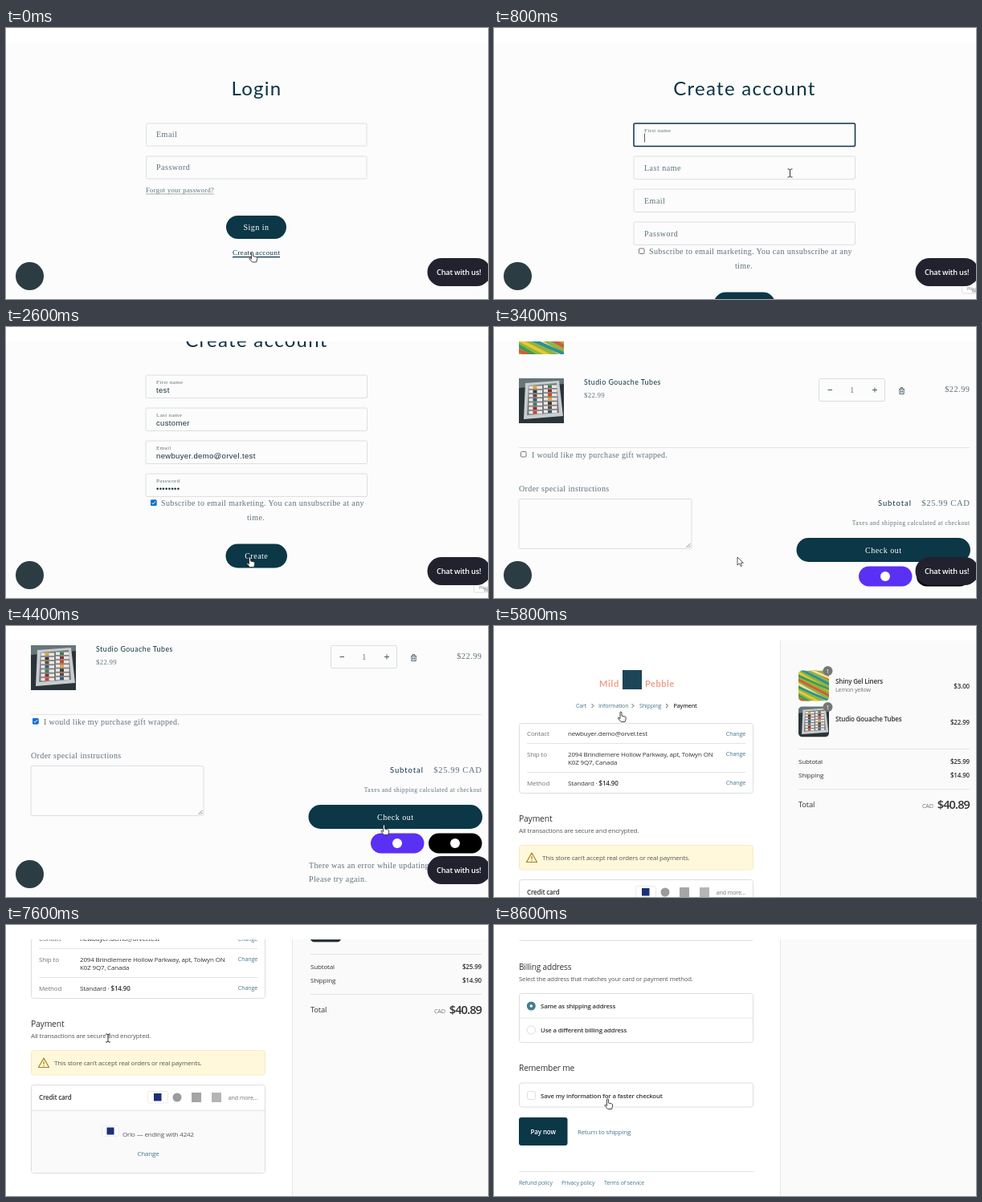
Recreate the animation shown at these times as an HTML page. Size 600 px wide and 338 px high, loop 8.8 s.

```html
<!DOCTYPE html>
<html lang="en">
<head>
<meta charset="utf-8">
<title>Store checkout</title>
<style>
  html, body { margin: 0; width: 100%; height: 100%; overflow: hidden; background: #fff; }
  svg#stage { display: block; width: 100vw; height: 100vh; }
  text { white-space: pre; }
  .serif { font: 10px "Liberation Serif", serif; letter-spacing: .38px; fill: #5d727a; }
  .head { font: 24px Lato, sans-serif; letter-spacing: 1.3px; fill: #0c3344; }
  .input { font: 9.5px "Liberation Sans", sans-serif; letter-spacing: .35px; fill: #17313c; }
  .ui { font: 8px "Open Sans", sans-serif; letter-spacing: -.02em; fill: #333; }
  .bold { font-weight: 600; }
  .grey { fill: #737373; }
  .link { fill: #457789; }
  .white { fill: #fff; }
  .dark { fill: #0c3344; }
  .mid { text-anchor: middle; }
  .end { text-anchor: end; }
  .teal { fill: #0b3747; }
  .line { stroke: #e4e4e4; fill: none; }
  .card { fill: #fff; stroke: #dedede; }
  .field { fill: #fcfcfc; stroke: #dcdfe0; }
</style>
</head>
<body>
<svg id="stage" viewBox="0 0 600 338">
  <defs>
    <clipPath id="view"><rect y="18" width="600" height="320"/></clipPath>
    <clipPath id="square"><rect width="56" height="56"/></clipPath>
    <clipPath id="round"><rect width="56" height="56" rx="7"/></clipPath>
  </defs>
  <g clip-path="url(#view)" id="world"></g>
  <g id="pointer">
    <path id="hand" fill="#fff" stroke="#333" stroke-width=".9" stroke-linejoin="round"
      d="M-1 1a1 1 0 0 1 2 0v4l4 1q1.6.5 1.2 2l-1 4.5h-5.2l-3.6-4.3q-.2-1.6 1.6-.4l1 .9z"/>
    <path id="beam" fill="none" stroke="#333" d="M-3-5h2l1 1 1-1h2M-3 5h2l1-1 1 1h2M0-4V4"/>
    <path id="arrow" fill="#fff" stroke="#333" stroke-width=".8" d="M0 0v10l2.4-2.2 1.8 3.7 1.6-.8-1.7-3.5h3.2z"/>
  </g>
</svg>
<script>
const STEP = 200, LOOP = 8800;
const $ = id => document.getElementById(id);

// Markup helpers
const text = (x, y, str, cls, style = '') => `<text x="${x}" y="${y}" class="${cls}" style="${style}">${str}</text>`;
const size = (px, gap) => `font-size:${px}px` + (gap === undefined ? '' : `;letter-spacing:${gap}px`);
const rect = (x, y, w, h, rest = '') => `<rect x="${x}" y="${y}" width="${w}" height="${h}" ${rest}/>`;
const rule = (x1, x2, y) => `<path class="line" d="M${x1} ${y}H${x2}"/>`;
const disc = (x, y, r, rest) => `<circle cx="${x}" cy="${y}" r="${r}" ${rest}/>`;
const range = (n, fn) => Array.from({ length: n }, (_, i) => fn(i)).join('');
const pill = (x, y, w, h, label, base) => rect(x, y, w, h, `rx="${h / 2}" class="teal"`) +
  text(x + w / 2, base, label, 'serif white mid', size(10, .5));
const box = (x, y, id) => rect(x + .5, y + .5, 6.5, 6.5, 'rx="1" fill="#fff" stroke="#777"') +
  `<g id="${id}">${rect(x, y, 7.5, 7.5, 'rx="1" fill="#0b6fd3"')}<path d="M${x + 1.6} ${y + 3.8}l1.6 1.6 2.8-3.4" fill="none" stroke="#fff"/></g>`;

// Product pictures reduced to flat shapes
const photo = (x, y, w, body, clip) =>
  `<g transform="translate(${x} ${y}) scale(${w / 56})"><g clip-path="url(#${clip})">${body}</g></g>`;
const paints = ['#d9a43a', '#c8452f', '#8d2f35', '#3f7d4b', '#315c80', '#6b4636', '#39393b'];
const tubes = rect(0, 0, 56, 56, 'fill="#2b3439"') +
  '<path d="M0 0H56V7L0 12Z" fill="#66757a"/><path d="M8 6L50 3L55 47L6 51Z" fill="#c9cdd0"/>' +
  '<path d="M12 9L47 6L50 43L10 46Z" fill="#77797f"/>' +
  range(14, i => {
    const px = 12.5 + (i % 2) * 18.5, y = 9.5 + (i >> 1) * 5.2 - (i % 2);
    return rect(px, y, 16.5, 3.6, 'fill="#e9e6e0"') + rect(px + 5, y, 5, 3.6, `fill="${paints[(i * 3) % 7]}"`);
  });
const pens = rect(0, 0, 56, 56, 'fill="#8fb443"') + range(16, i =>
  `<path d="M-8 ${i * 7 - 36}L64 ${i * 7 - 4 + (i % 3) * 5}" stroke="${['#e8c832', '#3f9a55', '#d9573c', '#f0e3a0', '#2d8f9a'][i % 5]}" stroke-width="4"/>`);

// Login
const login = text(312, 84, 'Login', 'head mid') +
  ['Email', 'Password'].map((s, i) => rect(174.5, 119 + i * 41, 274.5, 28, 'rx="1.5" class="field"') +
    text(187, 136 + i * 41, s, 'serif', size(10, .5))).join('') +
  text(174, 205, 'Forgot your password?', 'serif', size(8.5, .33)) +
  '<path d="M174 207H259" stroke="#8b9aa0" stroke-width=".8"/>' +
  pill(274, 234, 75, 29, 'Sign in', 252) +
  text(282, 282.5, 'Create account', 'serif dark', size(9, .4)) +
  '<path d="M282 285.6H341" stroke="#0c3344" stroke-width="1.4"/>';

// Registration form
const dots = n => '•'.repeat(n);
const fields = [
  { label: 'First name', value: { 0: '', 5: 'test' } },
  { label: 'Last name', value: { 0: '', 6: 'customer' } },
  { label: 'Email', value: { 0: '', 7: 'newbuyer.demo', 8: 'newbuyer.demo@orvel.test' } },
  { label: 'Password', value: { 0: '', 9: dots(4), 10: dots(8) } }
];
const register = text(312, 84, 'Create account', 'head mid') +
  fields.map((f, i) => {
    const y = 119 + i * 41;
    return rect(174, y, 275.5, 28.5, `id="frame${i}" rx="1.5" class="field"`) +
      text(187, 0, f.label, 'serif').replace('<text', `<text id="label${i}"`) +
      text(187, y + 21.5, '', 'input').replace('<text', `<text id="value${i}"`);
  }).join('') +
  rect(0, 0, .8, 11, 'id="caret" fill="#333"') +
  box(180, 274.5, 'optin') +
  text(193, 282, 'Subscribe to email marketing. You can unsubscribe at any', 'serif') +
  text(311, 299.5, 'time.', 'serif mid') +
  pill(273.5, 329.5, 76.5, 30, 'Create', 348);

// Cart
const cartRow = (y, pic, name, price) => photo(31, y, 56, pic, 'square') +
  text(112, y + 8, name, 'head', size(8.8, .5)) +
  text(112, y + 24, price, 'serif', size(8.8, .3)) +
  rect(404.5, y + .5, 82, 28, 'rx="1.5" class="field"') +
  `<path d="M415.5 ${y + 14.5}h5.5M471 ${y + 14.5}h6M474 ${y + 11.5}v6" stroke="#44606b" fill="none"/>` +
  text(446, y + 17.5, '1', 'serif mid') +
  `<path d="M504 ${y + 13.5}h7M506.2 ${y + 13}v-1.5h2.6v1.5M504.8 ${y + 14}v5.5h5.4v-5.5M506.6 ${y + 15}v3M508.4 ${y + 15}v3" fill="none" stroke="#2a4854" stroke-width=".8"/>` +
  text(592.5, y + 17, price, 'serif end', size(10.3, .5));
const cart = cartRow(-62, pens, 'Shiny Gel Liners', '$3.00') +
  cartRow(24, tubes, 'Studio Gouache Tubes', '$22.99') +
  rule(31, 592, 110.5) + box(33, 115, 'wrap') +
  text(47, 123, 'I would like my purchase gift wrapped.', 'serif', size(10, .31)) +
  text(31, 165, 'Order special instructions', 'serif') +
  rect(31, 174.5, 215, 62, 'rx="1.5" class="field"') +
  '<path d="M239.5 235l5-5M242.5 235l2-2" stroke="#666" stroke-width=".8"/>' +
  text(478, 183, 'Subtotal', 'head', size(9.4, .95)) +
  text(592.5, 183, '$25.99 CAD', 'serif end', size(10.6, .6)) +
  text(592.5, 207, 'Taxes and shipping calculated at checkout', 'serif end', size(7.5, .5)) +
  pill(376.5, 223, 216.5, 30, 'Check out', 241.5) +
  rect(454, 258.5, 66.5, 25, 'rx="12.5" fill="#5a31f4"') + disc(487, 271, 6, 'fill="#fff"') +
  rect(526, 258.5, 66.5, 25, 'rx="12.5"') + disc(559, 271, 6, 'fill="#fff"') +
  `<g id="error">${text(377, 301.5, 'There was an error while updating your cart.', 'serif')}${text(377, 318.5, 'Please try again.', 'serif')}</g>`;

// Checkout
const infoRow = (y, key, lines) => text(41, y, key, 'ui grey') +
  lines.map((s, i) => text(92, y + i * 10.5, s, 'ui')).join('') +
  text(313, y - .5, 'Change', 'ui link end', size(7.1));
const itemRow = (y, pic, name, note, price) => photo(379, y - .5, 38, pic, 'round') +
  disc(415.5, y, 6, 'fill="#777"') + text(415.5, y + 2.5, '1', 'ui white mid', size(7.3)) +
  text(425, y + (note ? 16 : 18), name, 'ui bold') + text(425, y + 25.5, note, 'ui grey', size(7.1)) +
  text(592, y + 21.5, price, 'ui bold end');
const sumRow = (y, key, price) => text(379, y, key, 'ui') + text(592, y, price, 'ui bold end');
const panel = (y, h) => rect(31.5, y + .5, 291, h, 'rx="3" class="card"');
const crumbs = [[102, 'Cart'], [130, 'Information'], [181, 'Shipping'], [223.5, 'Payment']];
const logo = ';font-weight:700;fill:#f09d85';
const small = 'rx="2" class="card" style="stroke:#ececec"';

const checkout = text(131, 76, 'Mild', 'head', size(11, .7) + logo) +
  text(188, 76, 'Pebble', 'head', size(11, .5) + logo) +
  rect(160, 55, 24, 24, 'fill="#1d4558"') +
  crumbs.map(([x, s], i) => text(x, 102, s, i < 3 ? 'ui link' : 'ui bold', size(7))).join('') +
  [121.5, 171.5, 214].map(x => `<path d="M${x} 97l2.5 2.5-2.5 2.5" fill="none" stroke="#555"/>`).join('') +
  panel(121, 87) +
  infoRow(137, 'Contact', ['newbuyer.demo@orvel.test']) + rule(41, 313, 146.5) +
  infoRow(162.5, 'Ship to', ['2094 Brindlemere Hollow Parkway, apt, Tolwyn ON', 'K0Z 9Q7, Canada']) + rule(41, 313, 182.5) +
  infoRow(198.5, 'Method', ['Standard · <tspan class="bold">$14.90</tspan>']) +
  text(31, 244, 'Payment', 'ui', size(10.4)) +
  text(31, 257.5, 'All transactions are secure and encrypted.', 'ui', 'fill:#555') +
  rect(31.5, 273.5, 291, 30.5, 'rx="3" fill="#fff8db" stroke="#f5ebc4"') +
  '<path d="M47 283l6.5 11.5h-13zM47 287v4M47 292v1.2" fill="none" stroke="#a5831c" stroke-width="1.2" stroke-linejoin="round"/>' +
  text(60, 291.5, 'This store can’t accept real orders or real payments.', 'ui', 'fill:#555') +
  panel(316, 110) + '<path d="M32 348.5H322V423q0 3-3 3H35q-3 0-3-3Z" fill="#fafafa"/>' + rule(32, 322, 348.5) +
  text(41, 334.5, 'Credit card', 'ui bold') +
  rect(176.5, 324.5, 25, 14.5, small) +
  rect(184, 327, 9.5, 9.5, 'fill="#1c2f78"') + disc(213, 332, 5.5, 'fill="#9b9b9b"') +
  rect(231, 326, 12, 12, 'fill="#a5a5a5"') + rect(256, 326, 12, 12, 'fill="#b5b5b5"') +
  text(313, 335, 'and more...', 'ui grey end', size(7.1)) +
  rect(119.5, 367.5, 21, 13, small) + rect(125.5, 369.5, 9, 9, 'fill="#1c2f78"') +
  text(145, 381, 'Orlo — ending with 4242', 'ui', 'fill:#555') +
  text(177, 405, 'Change', 'ui link mid') +
  text(31, 463, 'Billing address', 'ui', size(10.1)) +
  text(31, 477, 'Select the address that matches your card or payment method.', 'ui', size(7.7) + ';fill:#555') +
  panel(492, 61) + rule(32, 322, 523) +
  disc(46.3, 508, 5.5, 'fill="#457d92"') + disc(46.3, 508, 1.7, 'fill="#fff"') + disc(46.3, 538, 5.2, 'class="card"') +
  text(58, 511, 'Same as shipping address', 'ui bold', size(7.8)) +
  text(58, 541, 'Use a different billing address', 'ui bold', size(7.8)) +
  text(31, 589, 'Remember me', 'ui', size(10.3)) +
  panel(603.5, 30) + rect(41.5, 614.5, 10, 10, 'rx="2" class="card"') +
  text(58, 622.5, 'Save my information for a faster checkout', 'ui bold', size(7.8)) +
  rect(31, 647, 60.5, 35, 'rx="3" class="teal"') + text(61.2, 668, 'Pay now', 'ui bold white mid') +
  text(104, 668, 'Return to shipping', 'ui link') + rule(31, 323, 714.5) +
  [[31, 'Refund policy'], [84, 'Privacy policy'], [137, 'Terms of service']].map(([x, s]) => text(x, 731, s, 'ui link', size(6.9))).join('') +
  itemRow(56, pens, 'Shiny Gel Liners', 'Lemon yellow', '$3.00') +
  itemRow(101, tubes, 'Studio Gouache Tubes', '', '$22.99') +
  rule(379, 592, 153.5) + sumRow(172, 'Subtotal', '$25.99') + sumRow(188.5, 'Shipping', '$14.90') +
  rule(379, 592, 203.5) + text(379, 226, 'Total', 'ui', size(9.4)) +
  text(547, 226.5, 'CAD', 'ui grey end', size(7.3)) +
  text(592, 228, '$40.89', 'ui bold end', size(14.6, -.9));

const scene = (id, body) => `<g id="${id}">${body}</g>`;
$('world').innerHTML =
  scene('shop', rect(0, 18, 600, 320, 'fill="#fcfcfc"')) +
  scene('login', login) + scene('register', register) + scene('cart', cart) +
  scene('sidebar', rect(356, 18, 244, 319.5, 'fill="#fafafa"') + '<path class="line" d="M356.5 18V337.5"/>') +
  scene('checkout', checkout) +
  scene('privacy', rect(582.5, 317.5, 20, 13.5, 'rx="1.5" class="card"') +
    text(589, 326.5, 'Privacy', 'ui grey', size(5.5)) + text(594, 330, 'Terms', 'ui grey', size(5))) +
  scene('overlay', disc(29.5, 309.5, 17.5, 'fill="#2c3c43"') +
    rect(524.5, 287, 79, 35, 'rx="17.5" fill="#22222f"') + text(536, 308, 'Chat with us!', 'ui bold white', size(9.2)));

// Timelines: a value holds from its step until the next key
const at = (keys, n) => keys[Object.keys(keys).map(Number).filter(k => k <= n).pop()];
const sceneKeys = { 0: 'login', 2: '', 3: 'register', 15: '', 16: 'cart', 25: '', 26: 'checkout' };
const scrollKeys = { 0: 0, 11: 30, 12: 59, 16: -86, 17: -40, 18: 0, 38: 117, 39: 205, 40: 290, 41: 365, 42: 407 };
const focusKeys = { 0: -1, 4: 0, 6: 1, 7: 2, 9: 3, 11: -1 };
const pointerKeys = {
  0: ['hand', 306.5, 279.5], 4: ['beam', 368.5, 181], 11: ['beam', 300, 205], 12: ['arrow', 184, 220],
  13: ['hand', 303.5, 287], 16: ['arrow', 303, 287], 18: ['arrow', 180, 200],
  20: ['arrow', 37, 119], 21: ['arrow', 260, 190], 22: ['hand', 470.5, 248], 26: ['arrow', 420, 230],
  27: ['arrow', 300, 190], 28: ['arrow', 200, 140], 29: ['hand', 158, 107], 31: ['arrow', 200, 90],
  32: ['arrow', 236, 80], 33: ['hand', 190, 97], 34: ['beam', 150, 135], 35: ['arrow', 124, 182],
  36: ['beam', 116, 162], 37: ['beam', 127, 141], 39: ['arrow', 130, 165], 41: ['arrow', 137, 200], 42: ['hand', 141.5, 217]
};

const show = (id, on) => $(id).setAttribute('visibility', on ? 'visible' : 'hidden');
const move = (id, x, y) => $(id).setAttribute('transform', `translate(${x} ${y})`);

function drawForm(n, visible) {
  const focus = at(focusKeys, n);
  fields.forEach((f, i) => {
    const value = at(f.value, n), raised = value || focus === i, y = 119 + i * 41;
    $('value' + i).textContent = value;
    $('label' + i).setAttribute('y', y + (raised ? 10.5 : 17.5));
    $('label' + i).style.cssText = raised ? size(7, .35) : size(10, .5);
    $('frame' + i).style.cssText = focus === i ? 'stroke:#0c3344;stroke-width:1.5' : '';
  });
  show('caret', visible && focus >= 0);
  if (focus >= 0) move('caret', 187 + $('value' + focus).getComputedTextLength(), 131.5 + focus * 41);
}

function draw(n) {
  const now = at(sceneKeys, n), store = ['login', 'register', 'cart'].includes(now);
  for (const id of ['login', 'register', 'cart', 'checkout']) show(id, id === now);
  show('shop', store);
  show('overlay', store);
  show('privacy', now === 'register');
  show('sidebar', now === 'checkout');
  show('optin', now === 'register' && n >= 12);
  show('wrap', now === 'cart' && n >= 20);
  show('error', now === 'cart' && n >= 21);
  if (now) move(now, 0, -at(scrollKeys, n));
  drawForm(n, now === 'register');

  const [kind, x, y] = at(pointerKeys, n);
  for (const id of ['hand', 'beam', 'arrow']) show(id, now && id === kind);
  move('pointer', x, y);
}

const start = performance.now();
let last = -1;
function tick() {
  const n = Math.floor(((performance.now() - start) % LOOP) / STEP);
  if (n !== last) draw(last = n);
  requestAnimationFrame(tick);
}
tick();
</script>
</body>
</html>
```
